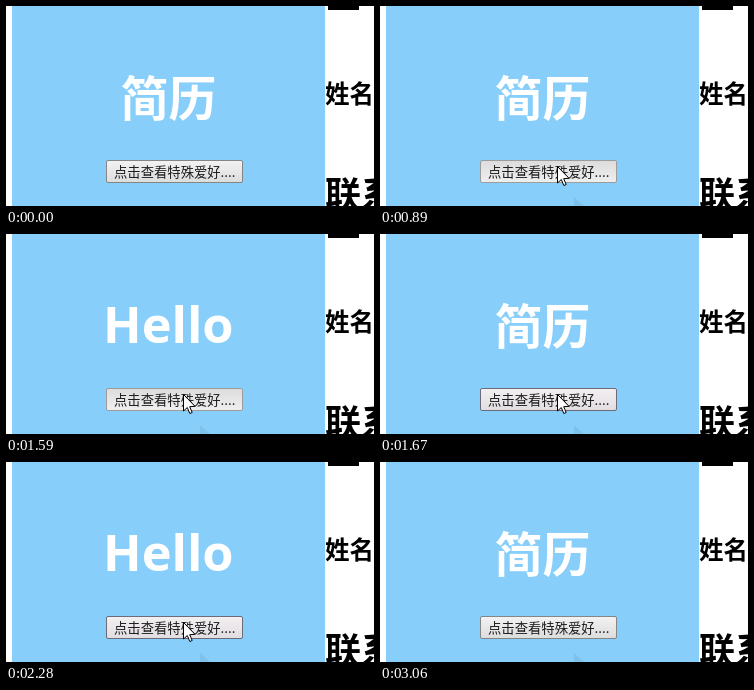
An HTML page with a canvas for the animation above (3.74 s loop, 368x200 px).

```html
<!DOCTYPE html>
<html lang="zh-CN">
<head>
<meta charset="utf-8">
<style>
  html, body { margin: 0; width: 100%; height: 100%; overflow: hidden; background: #fff; }
  canvas { display: block; }
</style>
</head>
<body>
<canvas id="stage" width="368" height="200"></canvas>
<script>
const ctx = document.getElementById('stage').getContext('2d');
const CJK = '"Noto Sans CJK SC", "Noto Sans CJK", sans-serif';
const LATIN = '"Open Sans", "Noto Sans", sans-serif';

// Times in ms
const LOOP = 3740, STEP = 76.6, PRESS = 80;
const ENTER = 430, LEAVE = 2830, GONE = 3060;
const clicks = [890, 1590, 2200, 2750];

// Key points of the pointer's way
const below = { x: 194, y: 191 };
const above = { x: 195, y: 148 };
const rest = { x: 177, y: 160 };
const exit = { x: 316, y: 202 };

const looks = {
  idle: { top: '#f3f3f3', bottom: '#dcdcdc', border: '#858585' },
  hover: { top: '#f4f0f2', bottom: '#e0dce0', border: '#6c6c78' },
  down: { top: '#dcdcdc', bottom: '#efefef', border: '#9c9c9c' }
};

const arrow = new Path2D('M.5 .5V17l3.8-3.5 2.5 6 2.4-1-2.5-5.8 5.3-.4z');

const easeOut = u => 1 - (1 - u) ** 2;
const smooth = u => u * u * (3 - 2 * u);
const steps = (t, from) => Math.floor((t - from) / STEP);

function mix(a, b, u) {
  return { x: a.x + (b.x - a.x) * u, y: a.y + (b.y - a.y) * u };
}

function pointerAt(t) {
  if (t >= LEAVE) return mix(rest, exit, Math.min(1, steps(t, LEAVE) / 3));
  const n = Math.min(6, steps(t, ENTER));
  return n < 3 ? mix(below, above, easeOut(n / 3)) : mix(above, rest, smooth((n - 3) / 3));
}

function text(str, x, y, font, color) {
  ctx.font = font;
  ctx.fillStyle = color;
  ctx.fillText(str, x, y);
}

function rect(x, y, w, h, color) {
  ctx.fillStyle = color;
  ctx.fillRect(x, y, w, h);
}

function page() {
  rect(0, 0, 368, 200, '#fff');
  rect(6, 0, 313, 200, '#87cefa');
  rect(322, 0, 31, 4, '#000');
  text('姓名', 319, 97, 'bold 24.5px ' + CJK, '#000');
  text('联系', 319, 202, 'bold 36px ' + CJK, '#000');
}

function title(hello) {
  if (hello) text('Hello', 97, 109, 'bold 50.5px ' + LATIN, '#fff');
  else text('简历', 114.5, 110, 'bold 48px ' + CJK, '#fff');
}

function button({ top, bottom, border }) {
  const fill = ctx.createLinearGradient(0, 154, 0, 177);
  fill.addColorStop(0, top);
  fill.addColorStop(1, bottom);
  ctx.beginPath();
  ctx.roundRect(100.5, 154.5, 136, 22, 1.5);
  ctx.fillStyle = fill;
  ctx.fill();
  ctx.strokeStyle = border;
  ctx.stroke();
  text('点击查看特殊爱好....', 108, 171, '13.333px ' + CJK, '#1c1c1c');
}

// Faint mark left where the pointer came in
function trace() {
  ctx.beginPath();
  ctx.moveTo(below.x, below.y);
  ctx.lineTo(below.x, 200);
  ctx.lineTo(below.x + 10, 200);
  ctx.fillStyle = '#80c1ea';
  ctx.fill();
}

function pointer({ x, y }) {
  ctx.save();
  ctx.translate(Math.round(x), Math.round(y));
  ctx.fillStyle = '#fff';
  ctx.fill(arrow);
  ctx.strokeStyle = '#000';
  ctx.stroke(arrow);
  ctx.restore();
}

function draw(t) {
  const shown = t >= ENTER && t < GONE;
  const tip = pointerAt(t);
  const over = shown && tip.y > 154 && tip.y < 177 && tip.x < 237;
  const down = clicks.some(c => t >= c && t < c + PRESS);
  const released = clicks.filter(c => t >= c + PRESS).length;

  page();
  title(released % 2 === 1);
  button(down ? looks.down : over ? looks.hover : looks.idle);
  if (t >= ENTER + STEP) trace();
  if (shown) pointer(tip);
}

const start = performance.now();
function tick() {
  draw((performance.now() - start) % LOOP);
  requestAnimationFrame(tick);
}
tick();
</script>
</body>
</html>
```
